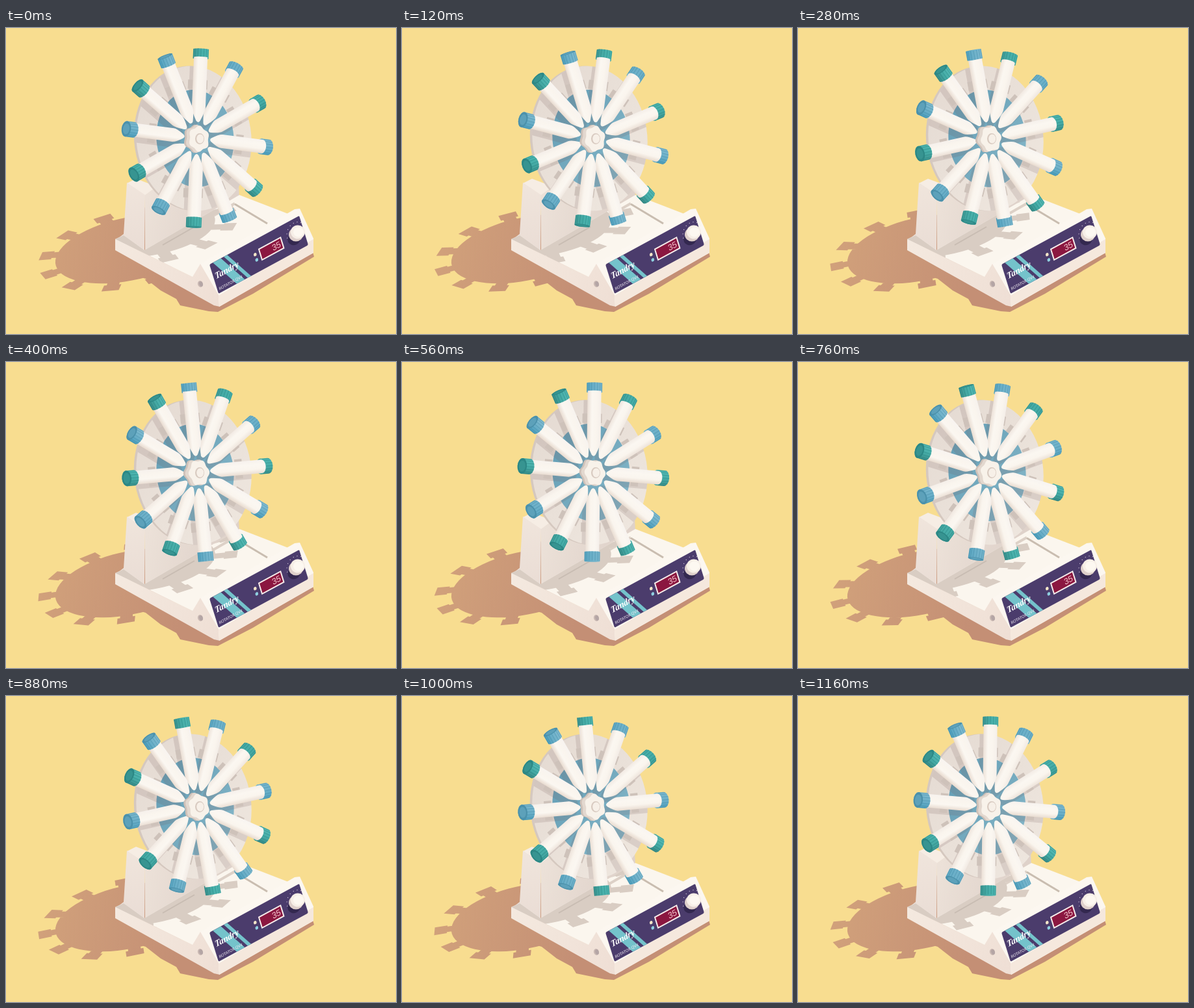
These frames come from a looping animation (600x471 px, 1.2 s). An HTML page with a canvas:

```html
<!DOCTYPE html>
<html lang="en">
<head>
<meta charset="utf-8">
<title>Tube rotator</title>
<style>
html, body { margin: 0; width: 100%; height: 100%; overflow: hidden; background: #f8dd90; }
canvas { display: block; }
</style>
</head>
<body>
<canvas id="stage" width="600" height="471"></canvas>
<script>
const c = document.getElementById('stage').getContext('2d');
const TAU = Math.PI * 2, RAD = Math.PI / 180;
const HUB = [294.4, 169.5];
const RIGHT = [103.8, 6.7], UP = [0, -130.1];   // wheel plane as seen on screen

const reset = () => c.setTransform(1, 0, 0, 1, 0, 0);
const plane = (u, v, x, y) => c.setTransform(u[0], u[1], v[0], v[1], x, y);

function poly(points, fill) {
  c.beginPath();
  points.forEach(p => c.lineTo(...p));
  c.closePath();
  if (fill) { c.fillStyle = fill; c.fill(); }
}

function oval(x, y, rx, ry, fill, tilt = 0) {
  c.beginPath();
  c.ellipse(x, y, rx, ry, tilt, 0, TAU);
  if (fill) { c.fillStyle = fill; c.fill(); }
}

function ramp(x0, y0, x1, y1, ...colors) {
  const g = c.createLinearGradient(x0, y0, x1, y1);
  colors.forEach((col, i) => g.addColorStop(i / (colors.length - 1), col));
  return g;
}

function line(x0, y0, x1, y1, color, width) {
  c.beginPath();
  c.moveTo(x0, y0);
  c.lineTo(x1, y1);
  c.strokeStyle = color;
  c.lineWidth = width;
  c.stroke();
}

// Silhouette of the whole wheel, cast on a flat surface
function castWheel(u, v, x, y, turn, disc, fill) {
  c.save();
  plane(u, v, x, y);
  c.beginPath();
  c.arc(0, 0, disc, 0, TAU);
  const bar = (r0, r1, w, s, k) => {
    [[r0, -w], [r1, -w], [r1, w], [r0, w]].forEach(([r, t], i) =>
      c[i ? 'lineTo' : 'moveTo'](r * k - t * s, r * s + t * k));
    c.closePath();
  };
  for (let i = 0; i < 12; i++) {
    const a = Math.PI / 2 - (turn + i * 30) * RAD;
    bar(.7, 1, .075, Math.sin(a), Math.cos(a));
    bar(.93, 1.08, .105, Math.sin(a), Math.cos(a));
  }
  reset();
  c.fillStyle = fill;
  c.fill();
  c.restore();
}

// Local frame with x running along the tube; near > 0 means it points at the viewer
function along(deg, dx = 0, dy = 0) {
  const s = Math.sin(deg * RAD), k = Math.cos(deg * RAD);
  const x = s * RIGHT[0] + k * UP[0], y = s * RIGHT[1] + k * UP[1];
  const a = Math.atan2(y, x);
  reset();
  c.translate(HUB[0] + dx, HUB[1] + dy);
  c.rotate(a);
  return { a, len: Math.hypot(x, y), near: -.61 * Math.sin((deg + 8) * RAD) };
}

function bodyPath(len, bulge, w = 10.5) {
  const end = .96 * len, neck = .36 * len, tip = .19 * len;
  c.beginPath();
  c.moveTo(end, -w);
  c.lineTo(neck, -w);
  c.quadraticCurveTo(neck - 5, -w, tip + 2, -3);
  c.quadraticCurveTo(tip - 2, 0, tip + 2, 3);
  c.quadraticCurveTo(neck - 5, w, neck, w);
  c.lineTo(end, w);
  c.ellipse(end, 0, bulge * w, w, 0, Math.PI / 2, -Math.PI / 2, true);
}

function drawTube(deg, green) {
  const { a, len, near } = along(deg);
  const lit = -.6 * Math.sin(a) - .8 * Math.cos(a);
  const bulge = Math.abs(near), w = 12;
  const tone = s => `hsl(28 35% ${91 + 5 * s * lit}%)`;

  const body = () => {
    bodyPath(len, bulge);
    c.fillStyle = ramp(0, -10.5, 0, 10.5, tone(-1), '#fbf7f1', '#faf5ee', tone(1));
    c.fill();
  };
  const cap = () => {
    const x0 = .945 * len, x1 = 1.055 * len, rx = bulge * w;
    const dark = green ? '#2c8785' : '#4b91ab';
    c.beginPath();
    c.ellipse(x0, 0, rx, w, 0, Math.PI / 2, Math.PI * 1.5);
    c.ellipse(x1, 0, rx, w, 0, -Math.PI / 2, Math.PI / 2);
    c.closePath();
    const hue = green ? '177 42%' : '196 46%';
    const base = green ? 46 : 59;
    c.fillStyle = ramp(0, -w, 0, w, `hsl(${hue} ${base - 8 * lit}%)`, `hsl(${hue} ${base + 2}%)`, `hsl(${hue} ${base + 8 * lit}%)`);
    c.fill();
    for (let j = -3; j <= 3; j++) {
      const t = j * Math.PI / 8, dx = Math.sign(near) * -rx * Math.cos(t), y = w * Math.sin(t);
      line(x0 + dx, y, x1 + dx, y, green ? '#237d7c70' : '#3f86a170', 1);
    }
    if (near > .1) {
      oval(x1, 0, rx, w, dark);
      oval(x1, 0, rx * .7, w * .7, green ? '#379491' : '#5da1ba');
    } else if (near < -.1) {
      oval(x0, 0, rx, w, green ? '#46a7a1' : '#76b5cb');
    }
  };
  if (near > 0) { body(); cap(); } else { cap(); body(); }
  reset();
}

const PLATE = [[168, 325], [181, 319], [213, 342], [359, 257], [434, 286], [300, 365], [288, 384]];

function drawBase(turn) {
  poly([[186, 239], [200, 232], [232, 244], [214, 258]], '#f6ede4');
  poly([[214, 257], [232, 244], [345, 200], [358, 240], [359, 262], [214, 343]],
    ramp(215, 270, 330, 300, '#ece1d8', '#dfd2ca'));
  poly([[186, 238], [214, 257], [213, 346], [168, 327], [181, 317]],
    ramp(184, 240, 200, 340, '#f0e5dc', '#eaddd5'));
  poly(PLATE, '#fbf6ee');

  c.save();
  poly(PLATE);
  c.clip();
  line(241, 334, 352, 270, '#ddd1c7', 4);
  line(352, 271, 402, 301, '#c9bdb0', 3);
  castWheel([87, -50], [-100, -22], 213, 309, turn, .82, '#d9cdc3');
  line(241, 334, 290, 306, '#c8bcb2', 2);
  c.restore();

  poly([[168, 325], [287, 383], [299, 363], [306, 364], [329, 411], [329, 429], [320, 427], [168, 342]],
    ramp(170, 330, 325, 420, '#f4e9df', '#efdfd5'));
  oval(299, 394, 4, 5, '#c9b8b2', -.3);
  oval(300, 394, 2.8, 4, '#b4a5a5', -.3);
  poly([[299, 363], [444, 279], [452, 278], [473, 324], [473, 346], [328, 429], [327, 411]], '#fcf7f0');
  poly([[327, 412], [473, 325], [473, 346], [328, 429]], '#f5e8dd');
}

function label(text, x, y, font, color, align = 'left') {
  c.font = font;
  c.textAlign = align;
  c.fillStyle = color;
  c.fillText(text, x, y);
}

function drawPanel() {
  c.save();
  plane([.879, -.478], [.298, .957], 313, 364);
  c.beginPath();
  c.roundRect(0, 0, 157, 47, 2);
  c.fillStyle = '#4b3c6c';
  c.fill();
  c.clip();
  poly([[6, 0], [20, 0], [46, 47], [32, 47]], '#74c3cb');
  poly([[25, 0], [31, 0], [57, 47], [51, 47]], '#74c3cb');
  label('Tandry', 3, 25, 'italic bold 14px "Liberation Serif", serif', '#fff');
  label('ROTATOR QV4', 3, 43, '6px Lato, sans-serif', '#f3edf3');
  c.fillStyle = '#f8eeec';
  c.fillRect(80, 15, 40, 19);
  c.fillStyle = '#8b1740';
  c.fillRect(82, 17, 36, 15);
  label('35', 116, 29, '13px "Liberation Sans", sans-serif', '#f7c8cf', 'right');
  oval(73, 20.5, 2.5, 2.5, '#f4e6c8');
  oval(73, 29, 2.5, 2.5, '#8fd0e0');
  for (let i = 0; i < 9; i++) {
    const a = Math.PI * (1 + i / 8);
    oval(145 + 16 * Math.cos(a), 22 + 16 * Math.sin(a), .7, .7, '#d5c9dc');
  }
  c.restore();
  oval(443, 325, 10, 9, '#33284f', -.5);
  oval(446, 318, 11, 10.5, '#dfd0cb');
  oval(449, 314, 11, 10.5, '#f7efe7');
  oval(450, 314, 8, 7.5, '#fdf8f1');
}

function drawWheel(turn) {
  const ring = (x, scale, fill) => {
    c.save();
    plane(RIGHT, UP, x, 170);
    c.beginPath();
    c.arc(0, 0, scale, 0, TAU);
    reset();
    if (fill) { c.fillStyle = fill; c.fill(); c.restore(); }
  };
  ring(285.5, .855, '#d5c8bf');
  ring(289, .855, ramp(205, 100, 370, 240, '#e5dbd3', '#eee6de'));
  ring(291, .575, ramp(232, 130, 352, 210, '#659fb6', '#83b5c7'));

  // Holders and the shade of the tubes stay on the disc
  c.save();
  plane(RIGHT, UP, 289, 170);
  c.beginPath();
  c.arc(0, 0, .855, 0, TAU);
  reset();
  c.clip();
  for (let i = 0; i < 12; i++) {
    const deg = turn + i * 30;
    const { len, near } = along(deg, -6, 8);
    bodyPath(len, Math.abs(near));
    c.fillStyle = '#755c5a2b';
    c.fill();
    along(deg, -3, 1);
    c.fillStyle = '#cec2ba';
    c.fillRect(.59 * len, -15, .11 * len, 30);
  }
  c.restore();

  for (const i of [3, 4, 2, 5, 1, 6, 0, 7, 11, 8, 10, 9]) drawTube(turn + i * 30, i % 2 === 0);
  drawHub(turn);
}

function drawHub(turn) {
  const nut = (x, r, fill) => {
    const points = [];
    for (let d = 0; d < 360; d += 6) {
      const q = r * (1 + .08 * Math.cos(6 * d * RAD)), a = (d + turn) * RAD;
      points.push([x + q * (RIGHT[0] * Math.sin(a)), 170.5 + q * (RIGHT[1] * Math.sin(a) + UP[1] * Math.cos(a))]);
    }
    poly(points, fill);
  };
  nut(290, .155, '#cfc1b8');
  nut(293, .155, '#e3d8cf');
  nut(297, .145, '#f8f2ea');
  oval(298, 170.5, 7, 8.5, '#d8cac0');
  oval(298.7, 170.5, 5.5, 7, '#f7f0e8');
}

function draw(ms) {
  const step = Math.floor(ms % 1200 / 40) * 40;
  // Two tube spacings per loop, so the cap colours line up again
  const turn = 3 + step * .05;
  reset();
  c.fillStyle = '#f8dd90';
  c.fillRect(0, 0, 600, 471);
  const shade = ramp(55, 330, 270, 390, '#d1a17b', '#c48f75');
  castWheel([21, -59], [-128, 13.5], 190, 340, turn, .88, shade);
  poly([[168, 335], [180, 375], [215, 386], [238, 404], [262, 417], [268, 427], [312, 436],
    [326, 437], [380, 409], [474, 352], [470, 338], [325, 418]], shade);
  drawBase(turn);
  drawPanel();
  drawWheel(turn);
}

function tick(now) {
  draw(now);
  requestAnimationFrame(tick);
}
draw(0);
requestAnimationFrame(tick);
</script>
</body>
</html>
```
